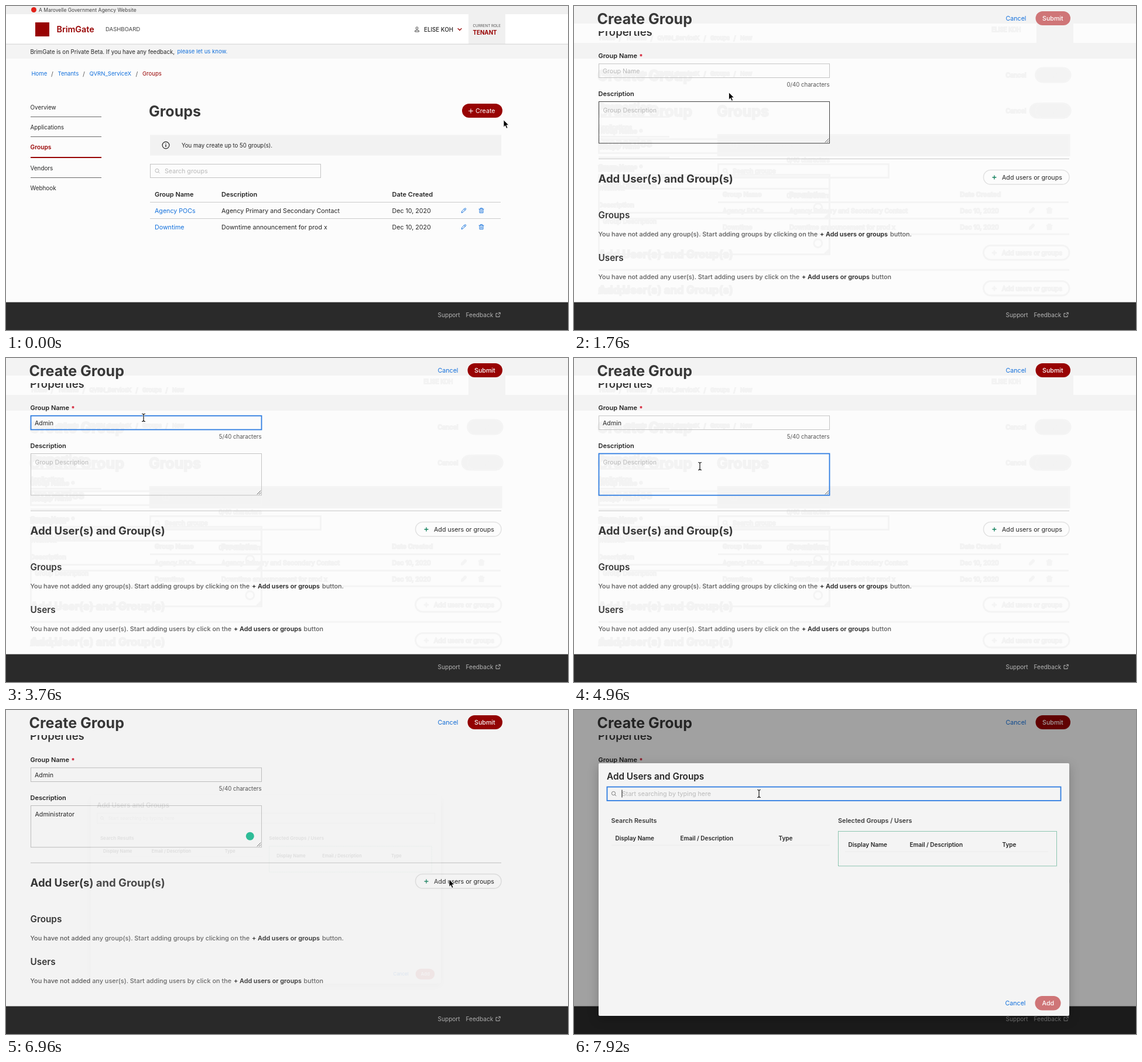
An HTML page that plays this animation: 960x554 px, repeating every 8000 ms.

```html
<!DOCTYPE html>
<html lang="en">
<head>
<meta charset="utf-8">
<title>Create a group</title>
<style>
html, body { margin: 0; width: 100%; height: 100%; overflow: hidden; background: #fcfcfc; }
svg { display: block; width: 960px; height: 554px; }
text { font-family: Inter, "Open Sans", sans-serif; font-optical-sizing: none; white-space: pre; }
.ghost text { fill: #f3f3f3; stroke: #f3f3f3; stroke-width: 2px; }
.ghost rect, .ghost path, .ghost circle { fill: none; stroke: #f4f4f4; stroke-width: 3px; }
.ghost .solid { fill: #f3f3f3; }
.ghost .flat { stroke: none; }
.lifted { filter: drop-shadow(0 5px 9px rgba(0, 0, 0, .22)); }
</style>
</head>
<body>
<svg id="stage" viewBox="0 0 960 554"></svg>
<script>
const LOOP = 8000, STEP = 80;
const RED = '#980303', PINK = '#cf7577', BLUE = '#1270dc', INK = '#262626', HEAD = '#383838';
const HINT = '#b9b9b9', FIELD = '#c4c4c4';
const BODY = 10.67, SMALL = 9.65;
const stage = document.getElementById('stage');

function el(parent, tag, attrs = {}) {
  const e = document.createElementNS('http://www.w3.org/2000/svg', tag);
  set(e, attrs);
  parent.appendChild(e);
  return e;
}
function set(e, attrs) { for (const k in attrs) e.setAttribute(k, attrs[k]); }
const group = (parent, attrs) => el(parent, 'g', attrs);
const rect = (p, x, y, width, height, fill, more) => el(p, 'rect', { x, y, width, height, fill, ...more });
const box = (p, x, y, w, h, stroke, more) => rect(p, x, y, w, h, 'none', { stroke, ...more });
const line = (p, x1, x2, y, stroke, w = 1) => el(p, 'path', { d: `M${x1} ${y}H${x2}`, stroke, 'stroke-width': w, fill: 'none' });
const path = (p, d, stroke, w = 1, fill = 'none') =>
  el(p, 'path', { d, stroke, 'stroke-width': w, fill, 'stroke-linecap': 'round', 'stroke-linejoin': 'round' });
const pill = (p, x, y, w, h, fill) => rect(p, x, y, w, h, fill, { rx: h / 2, class: 'solid' });

// y is the middle of the capitals
function text(p, x, y, str, size = BODY, fill = INK, weight = 400, anchor = 'start') {
  const e = el(p, 'text', {
    x: anchor === 'start' ? x - 0.5 : x, y: y + size * 0.364,
    'font-size': size, fill, 'font-weight': weight, 'text-anchor': anchor
  });
  e.textContent = str;
  return e;
}
const show = (e, on) => { e.style.display = on ? '' : 'none'; };

function magnifier(p, x, y, color) {
  el(p, 'circle', { cx: x - 0.5, cy: y - 0.5, r: 3.1, fill: 'none', stroke: color });
  path(p, `M${x + 1.9} ${y + 1.9}l2 2`, color);
}
function crumbs(p, items) {
  items.forEach(([x, str], i) => {
    const last = i === items.length - 1;
    text(p, x, 116, str, 9.55, last ? RED : BLUE);
    if (!last) text(p, items[i + 1][0] - 10, 116, '/', 10.5, '#555', 400, 'middle');
  });
}

function buildChrome(p) {
  rect(p, 0, 0, 960, 14, '#f0f0f0');
  el(p, 'circle', { cx: 47.5, cy: 6.5, r: 4.5, fill: '#e2231a' });
  text(p, 56.5, 7, 'A Marovelle Government Agency Website', 8.5, '#444');
  rect(p, 0, 14, 960, 51, '#fff');
  rect(p, 790, 14, 63, 51, '#f0f0f0');
  rect(p, 0, 66, 960, 24, '#f4f4f4');
  line(p, 0, 960, 65.2, '#cfcfcf');
  rect(p, 50, 28, 24, 24, RED);
  text(p, 87, 40, 'BrimGate', 14.3, RED, 600);
  text(p, 170.5, 40, 'DASHBOARD', 9.55, '#444');
  el(p, 'circle', { cx: 702, cy: 37.8, r: 1.9, fill: 'none', stroke: '#444' });
  path(p, 'M698.6 43.6v-.6q0-1.6 1.6-1.6h3.6q1.6 0 1.6 1.6v.6z', '#444');
  text(p, 714.5, 40, 'ELISE KOH', 9.75, INK, 500);
  path(p, 'M772 38.5l3 3 3-3', RED, 1.2);
  text(p, 798, 33.7, 'CURRENT ROLE', 6.25, '#555');
  text(p, 798, 45, 'TENANT', 9.75, RED, 700);
  text(p, 42, 78, 'BrimGate is on Private Beta. If you have any feedback,', SMALL);
  text(p, 293, 78, 'please let us know.', 9.55, BLUE);
}

function buildList(p) {
  crumbs(p, [[44, 'Home'], [89, 'Tenants'], [143, 'QVRN_ServiceX'], [233.5, 'Groups']]);
  ['Overview', 'Applications', 'Groups', 'Vendors', 'Webhook'].forEach((name, i) => {
    const on = i === 2, y = 173 + i * 34 + (i > 2 ? 2 : 0);
    text(p, 42, y, name, on ? 10.2 : 9.9, on ? RED : INK, on ? 600 : 400);
    if (i < 4) line(p, 42, 163, y + (on ? 18 : 16.5), on ? RED : '#6a6a6a', on ? 2 : 1);
  });
  text(p, 244.5, 180, 'Groups', 25, HEAD, 700);
  pill(p, 779, 167, 69, 24, RED);
  path(p, 'M790.5 179.5h7M794 176v7', '#fff', 1.1);
  text(p, 802.5, 179, 'Create', BODY, '#fff');
  rect(p, 246, 220.5, 600, 35, '#f2f2f2', { class: 'solid' });
  el(p, 'circle', { cx: 273, cy: 238, r: 5.9, fill: 'none', stroke: INK, 'stroke-width': 1.2 });
  path(p, 'M273 237.5v3M273 235.2v.1', INK, 1.4);
  text(p, 300.5, 238, 'You may create up to 50 group(s).', SMALL);
  box(p, 246.5, 270.5, 291, 23, FIELD);
  magnifier(p, 258.5, 282, HINT);
  text(p, 271.5, 282, 'Search groups', BODY, HINT);
  [[254.5, 'Group Name'], [368.5, 'Description'], [660, 'Date Created']]
    .forEach(([x, s]) => text(p, x, 321.7, s, 11, INK, 600));
  [['Agency POCs', 'Agency Primary and Secondary Contact'], ['Downtime', 'Downtime announcement for prod x']]
    .forEach(([name, about], i) => {
      const y = 349.7 + i * 28;
      line(p, 246, 845, y - 14.2, '#cbcbcb');
      text(p, 254.5, y, name, BODY, BLUE);
      text(p, 368.5, y, about);
      text(p, 660, y, 'Dec 10, 2020');
      path(p, `M778.3 ${y + 3.6}l.6-2.6 4.8-4.8q.8-.6 1.6.2t.2 1.6l-4.8 4.8zM782.6 ${y - 2.6}l1.9 1.9`, BLUE);
      path(p, `M808 ${y - 2.5}h8M810.4 ${y - 2.7}v-1.4h3.2v1.4M809 ${y - 2.3}v6.3h6v-6.3M811 ${y - 0.6}v3M813 ${y - 0.6}v3`, BLUE, 0.9);
    });
}

function buildForm(p) {
  const ui = {};
  crumbs(p, [[44, 'Home'], [89, 'Tenants'], [143, 'QVRN_ServiceX'], [233.5, 'Groups'], [284.5, 'New']]);
  text(p, 41.5, 234.7, 'Properties', 18.5, HEAD, 600);
  text(p, 42, 275, 'Group Name', 11, INK, 600);
  text(p, 112, 275.5, '*', 11, '#d0021b', 600);
  ui.nameBox = box(p, 42.5, 288.8, 394, 23.7, FIELD);
  ui.name = text(p, 49.5, 301, 'Group Name', BODY, HINT);
  ui.count = text(p, 436.5, 324.8, '0/40 characters', SMALL, '#555', 400, 'end');
  text(p, 42, 339.7, 'Description', 11, INK, 600);
  ui.aboutBox = box(p, 42.5, 353.5, 394, 71.2, FIELD);
  ui.about = text(p, 50, 368.3, 'Group Description', BODY, HINT);
  path(p, 'M429 423l6-6M432.5 423l2.5-2.5', '#555', 0.9);
  ui.badge = el(p, 'circle', { cx: 416.8, cy: 405.7, r: 7, fill: '#18bd92' });
  line(p, 42, 846, 451.3, '#c6c6c6');
  text(p, 42, 484.8, 'Add User(s) and Group(s)', 18.5, HEAD, 700);
  box(p, 699.5, 470.5, 146.5, 24.5, '#e2e2e2', { rx: 12.2, 'stroke-width': 1.5 });
  path(p, 'M715 483h6M718 480v6', '#12805c', 1.3);
  ui.add = text(p, 731.5, 483, 'Add users or groups');
  const notes = [
    [547, 'Groups', 'You have not added any group(s). Start adding groups by clicking on the', 420.5, 540.5, 'button.'],
    [620.5, 'Users', 'You have not added any user(s). Start adding users by click on the', 389.5, 509, 'button']
  ];
  for (const [y, title, before, x1, x2, after] of notes) {
    text(p, 42, y, title, 15.3, HEAD, 600);
    text(p, 42, y + 33, before, 10.87, '#5c5c5c', 500);
    text(p, x1, y + 33, '+ Add users or groups', 10.8, INK, 600);
    text(p, x2, y + 33, after, 10.87, '#5c5c5c', 500);
  }
  ui.caret = rect(p, 0, 0, 1, 13, '#111');
  return ui;
}

function buildTitle(p) {
  text(p, 40, 180, 'Create Group', 25, HEAD, 700);
  text(p, 738, 179, 'Cancel', BODY, BLUE);
  const button = pill(p, 788.5, 167, 59.5, 24, PINK);
  text(p, 800.5, 179, 'Submit', BODY, '#fff', 500);
  return button;
}

function buildFooter(p) {
  rect(p, 0, 506.5, 960, 48, '#2a2a2a');
  text(p, 738, 528, 'Support', 10.1, '#b4b4b4');
  text(p, 786, 528, 'Feedback', 10.1, '#b4b4b4');
  path(p, 'M839.5 525.5h-2.5v6h6v-2.5M840.5 528l3.5-3.5M841.5 524.3h2.7v2.7', '#b4b4b4');
}

function buildModal(p) {
  const ui = {};
  rect(p, 42, 91, 804, 432, '#f4f4f4', { rx: 2, class: 'lifted' });
  text(p, 56.5, 113.2, 'Add Users and Groups', 15.3, INK, 600);
  ui.search = box(p, 56.5, 131.5, 775, 23.5, FIELD);
  magnifier(p, 68, 143, '#777');
  text(p, 82.5, 143.2, 'Start searching by typing here', BODY, HINT);
  ui.caret = rect(p, 81.5, 136.5, 1, 13, '#111');
  text(p, 64, 189, 'Search Results', 10.8, '#3c3c3c', 600);
  text(p, 451.5, 189, 'Selected Groups / Users', 10.8, '#3c3c3c', 600);
  [[71, 182, 350, 219], [469, 574, 732, 230]].forEach(([a, b, c, y], i) => {
    text(p, a, y, 'Display Name', 10, INK, 600);
    text(p, b, y, 'Email / Description', 10, INK, 600);
    text(p, c, y, 'Type', 10, INK, 600);
    line(p, i ? 463 : 64, i ? 810 : 437, y + 12, '#ebebeb');
  });
  box(p, 451.5, 207.5, 373, 59.3, '#25966c', { 'stroke-dasharray': '1 1' });
  text(p, 737, 501, 'Cancel', BODY, BLUE);
  pill(p, 787.5, 489, 44, 24.5, PINK);
  text(p, 800, 501, 'Add', BODY, '#fff', 500);
  return ui;
}

function buildCursor(p) {
  const arrow = g => path(g, 'M0 0v12.2l2.8-2.6 2 4.7 2.2-.9-2-4.7h3.7z', '#fff', 0.8, '#000');
  const shapes = {};
  for (const k of ['arrow', 'no', 'beam', 'hand']) shapes[k] = group(p);
  arrow(shapes.arrow);
  arrow(shapes.no);
  el(shapes.no, 'circle', { cx: 8, cy: 21.3, r: 7, fill: '#eee', stroke: '#999', 'stroke-width': 2 });
  path(shapes.no, 'M3.6 16.9l8.8 8.8', '#999', 2);
  const beam = 'M-2.5-6.5q2.5 0 2.5 2V4.5q0 2-2.5 2M2.5-6.5q-2.5 0-2.5 2M0 4.5q0 2 2.5 2';
  path(shapes.beam, beam, '#fff', 2.6);
  path(shapes.beam, beam, '#111', 1.2);
  path(shapes.hand, 'M-1.2 1q0-1.6 1.2-1.6T1.2 1v4.5q3-.9 3.6.8 2.4-.3 2.6 2v2.7l-1.4 4.5h-6.2L-4.4 9.5q-.3-2 1.5-1.5l1.7 1.5z', '#000', 1, '#fff');
  path(shapes.hand, 'M1.4 10.5v3M3.6 10.5v3', '#000', 0.8);
  return shapes;
}

// layers, back to front
rect(stage, 0, 0, 960, 554, '#fcfcfc');
const ghosts = group(stage, { class: 'ghost' });
const clip = rect(el(el(stage, 'defs'), 'clipPath', { id: 'body' }), 0, 0, 960, 554, '#000');
const view = group(stage, { 'clip-path': 'url(#body)' });
const scroller = group(view);
const chrome = group(scroller), list = group(scroller), formBody = group(scroller);
buildChrome(chrome);
buildList(list);
const form = buildForm(formBody);
const title = group(stage);
const submit = buildTitle(title);
const footer = group(stage);
buildFooter(footer);
const shade = rect(stage, 0, 0, 960, 554, '#000');
const modalBox = group(stage);
const modal = buildModal(modalBox);
const pointer = group(stage);
const shapes = buildCursor(pointer);

// faint leftovers of earlier screens
function leave(parent, layer, y) {
  const copy = layer.cloneNode(true);
  copy.setAttribute('transform', `translate(0 ${y})`);
  parent.appendChild(copy);
}
const band = (p, x, y, w, h) => rect(p, x, y, w, h, '#f3f3f3', { class: 'solid flat' });
const oldList = group(ghosts), oldForm = group(ghosts);
leave(oldList, list, 0);
const oldFoot = band(ghosts, 0, 505, 960, 49);
band(oldForm, 0, 0, 960, 30);
band(oldForm, 0, 63, 960, 27);
band(oldForm, 790, 30, 63, 33);
text(oldForm, 714, 40, 'ELISE KOH', 9.75);
for (const y of [0, -61]) {
  leave(oldForm, formBody, y);
  leave(oldForm, title, y);
}

const route = [
  [0, 850, 195, 'arrow'], [160, 850, 195, 'arrow'], [400, 821, 179, 'hand'], [640, 821, 179, 'no'],
  [880, 821, 179, 'no'], [1040, 778, 258, 'arrow'], [1200, 700, 264, 'arrow'], [1360, 700, 264, 'arrow'],
  [1600, 341, 202, 'beam'], [1760, 264.5, 148, 'arrow'], [1920, 264.5, 148, 'arrow'], [2160, 235, 102, 'beam'],
  [3920, 235, 102, 'beam'], [4080, 225, 138, 'arrow'], [4240, 215, 185, 'beam'], [5680, 215, 185, 'beam'],
  [5760, 378, 262, 'arrow'], [5840, 440, 282, 'arrow'], [5920, 525, 284, 'arrow'], [6000, 751, 292.5, 'hand'],
  [6900, 751, 292.5, 'hand'], [6960, 757, 290, 'arrow'], [7200, 757, 290, 'arrow'], [7520, 316, 143, 'beam'],
  [LOOP, 316, 143, 'beam']
];
const clamp = (v, a = 0, b = 1) => Math.min(b, Math.max(a, v));
const typed = (t, start, gap, max) => clamp(Math.floor((t - start) / gap) + 1, 0, max);
const blink = (t, from) => t >= from && (t - from) % 1000 < 500;

function movePointer(t) {
  let i = 0;
  while (i < route.length - 2 && route[i + 1][0] <= t) i++;
  const [t0, x0, y0, shape] = route[i], [t1, x1, y1] = route[i + 1];
  const u = (t - t0) / (t1 - t0);
  pointer.setAttribute('transform', `translate(${x0 + (x1 - x0) * u} ${y0 + (y1 - y0) * u})`);
  for (const k in shapes) show(shapes[k], k === shape);
}
function fill(e, value, hint) {
  e.textContent = value || hint;
  e.setAttribute('fill', value ? INK : HINT);
}
function outline(e, focus, hover) {
  set(e, { stroke: focus ? '#2f7de1' : hover ? '#444' : FIELD, 'stroke-width': focus ? 1.8 : 1 });
}

function draw(t) {
  const onForm = t >= 640;
  const scroll = t < 1200 ? 0 : t < 1280 ? 61 : 190;
  const open = t >= 6950;
  show(list, !onForm);
  show(formBody, onForm);
  show(title, onForm);
  show(ghosts, onForm && !open);
  show(oldForm, scroll > 100);
  show(oldFoot, scroll < 100);
  clip.setAttribute('y', scroll > 100 ? 43 : 0);
  scroller.setAttribute('transform', `translate(0 ${-scroll})`);
  title.setAttribute('transform', `translate(0 ${-Math.min(scroll, 158)})`);
  footer.setAttribute('transform', `translate(0 ${onForm ? 190 - scroll : 0})`);

  const n = typed(t, 2720, 120, 5), m = typed(t, 5200, 45, 13);
  const inName = t >= 2320 && t < 4320, inAbout = t >= 4320 && !open;
  fill(form.name, 'Admin'.slice(0, n), 'Group Name');
  fill(form.about, 'Administrator'.slice(0, m), 'Group Description');
  form.count.textContent = `${n}/40 characters`;
  submit.setAttribute('fill', n ? RED : PINK);
  outline(form.nameBox, inName);
  outline(form.aboutBox, inAbout, t >= 1600 && t < 1840);
  show(form.badge, t >= 5280);
  form.add.setAttribute('fill', t >= 6000 && !open ? BLUE : INK);

  const last = inName ? (n ? 2720 + (n - 1) * 120 : 2320) : m ? 5200 + (m - 1) * 45 : 4320;
  show(form.caret, (inName || inAbout) && blink(t, last));
  const width = inName ? (n && form.name.getComputedTextLength()) : m && form.about.getComputedTextLength();
  set(form.caret, { x: 49.3 + width, y: inName ? 294.5 : 361.5 });

  show(shade, open);
  show(modalBox, open);
  const p = clamp((t - 6950) / 150), q = clamp((t - 6950) / 400);
  const k = 0.7 + 0.3 * (1 - (1 - p) ** 2.3);
  shade.setAttribute('opacity', 0.36 * (1 - (1 - q) ** 4.3));
  set(modalBox, { opacity: Math.min(1, p * 1.55), transform: `translate(444 307) scale(${k}) translate(-444 -307)` });
  outline(modal.search, t >= 7680);
  show(modal.caret, blink(t, 7680));
  movePointer(t);
}

const start = performance.now();
function tick() {
  const t = (performance.now() - start) % LOOP;
  draw(Math.floor(t / STEP) * STEP);
  requestAnimationFrame(tick);
}
tick();
</script>
</body>
</html>
```
